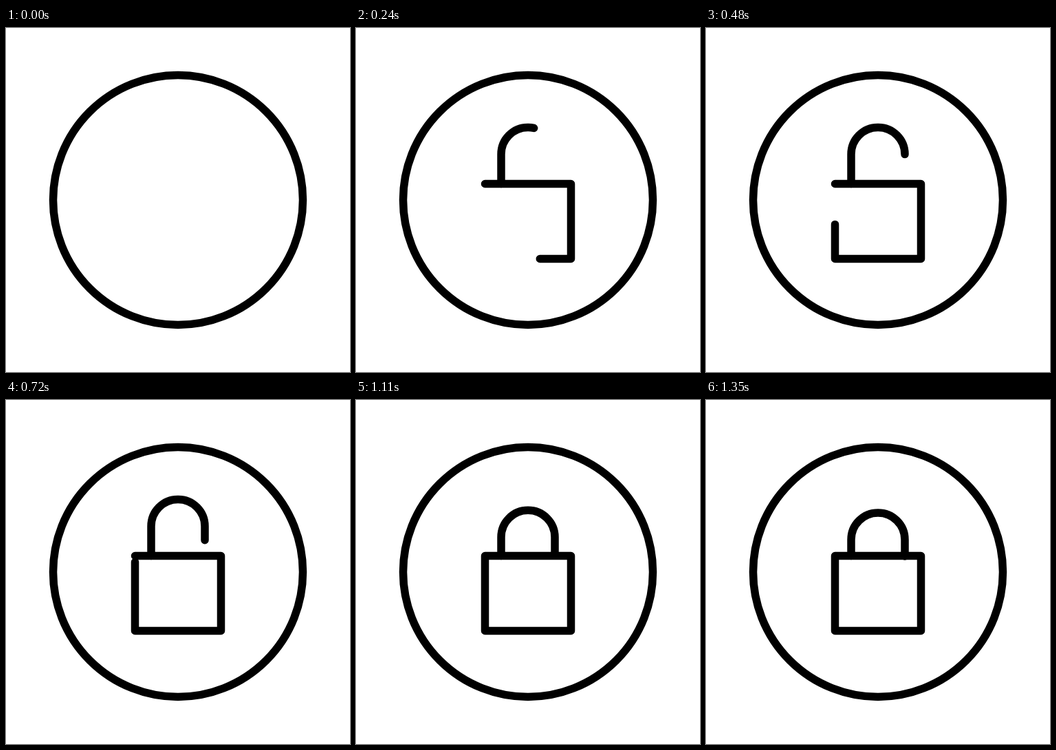
Animation of 500x500 px, one loop 2.73 s. Source, as an HTML page:

```html
<!DOCTYPE html>
<html lang="en">
<head>
<meta charset="utf-8">
<title>Padlock</title>
<style>
  html, body { margin: 0; height: 100%; overflow: hidden; background: #fff; }
  svg { display: block; width: 100%; height: 100%; }
</style>
</head>
<body>
<svg viewBox="0 0 500 500" fill="none" stroke="#000" stroke-width="11.5" stroke-linecap="round" stroke-linejoin="round">
  <circle cx="250" cy="250" r="181.5"/>
  <g id="lock">
    <path pathLength="1" d="M187.5 226.5H312.5V335.5H187.5V226.5"/>
    <path id="shackle" pathLength="1"/>
  </g>
</svg>
<script>
const LOOP = 2730, STEP = 30;
const lock = document.getElementById('lock');
const shackle = document.getElementById('shackle');

// Cubic Bezier easing (.167, .167, .22, 1), solved by bisection
const curve = (t, a, b) => 3 * t * (1 - t) ** 2 * a + 3 * t * t * (1 - t) * b + t ** 3;
function ease(x) {
  if (x <= 0) return 0;
  if (x >= 1) return 1;
  let lo = 0, hi = 1;
  for (let i = 0; i < 30; i++) {
    const mid = (lo + hi) / 2;
    if (curve(mid, .167, .22) < x) lo = mid; else hi = mid;
  }
  return curve(lo, .167, 1);
}

function draw(ms) {
  const t = Math.floor(ms % LOOP / STEP) * STEP;
  const drawn = ease((t + STEP) / 930);
  const drop = 19.5 * ease((t - 900) / 450);
  lock.style.display = t ? '' : 'none';
  lock.setAttribute('stroke-dasharray', drawn < 1 ? drawn + ' 2' : 'none');
  shackle.setAttribute('d', `M211 226.5V${183.5 + drop}a39 39 0 0 1 78 0V${207.4 + drop}`);
}

const start = performance.now();
function tick() {
  draw(performance.now() - start);
  requestAnimationFrame(tick);
}
tick();
</script>
</body>
</html>
```
